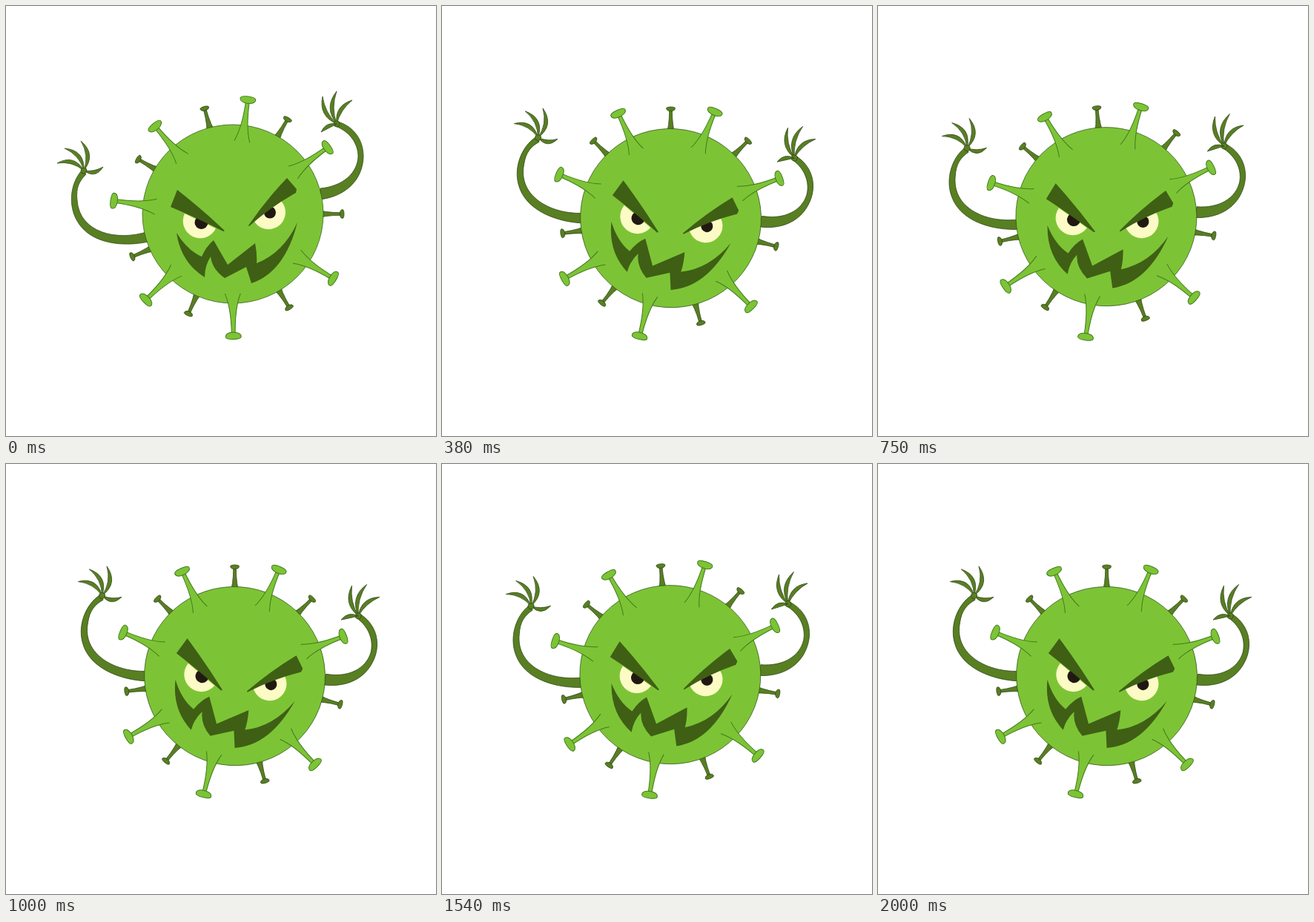
An HTML page for the animation above (2.04 s loop, 580x580 px).

```html
<!DOCTYPE html>
<html>
<head>
<meta charset="utf-8">
<style>
  html, body { margin: 0; width: 100%; height: 100%; overflow: hidden; background: #fff; }
  svg { display: block; width: 100vw; height: 100vh; }
  .back { fill: #587f22; stroke: #2c4212; stroke-width: .7; }
  .body { fill: #7cc435; stroke: #2f4f17; stroke-width: .7; }
  .spike { fill: #7cc435; stroke: #437a1d; stroke-width: 1; }
  .face { fill: #3f5f15; }
  .eye { fill: #fcfbc6; }
  .pupil { fill: #211911; }
</style>
</head>
<body>
<svg viewBox="0 0 580 580">
  <g id="virus">
    <g id="back" class="back">
      <path d="M192 304C150 318 99 306 96 262C94 245 99 236 108 227L102 222C86 240 84 270 96 290C114 322 160 325 192 318Z"/>
      <path d="M424 246C455 243 474 225 475 203C475 185 463 169 444 162L448 156C470 163 483 182 482 205C480 238 455 257 424 261Z"/>
    </g>
    <ellipse class="body" cx="306" cy="280.5" rx="122" ry="120.5"/>
    <g id="front" class="spike"></g>
    <path class="eye" d="M241 280L283 300A23 23 0 0 1 241 280ZM334 289L371 263A22.8 22.8 0 1 1 334 289Z"/>
    <circle class="pupil" cx="263.5" cy="292" r="9"/>
    <circle class="pupil" cx="356" cy="278.5" r="8"/>
    <path class="face" d="M231 248L222 271Q262 288 293 304L295 303Q263 273 231 248ZM379 232L392 247L391 252Q357 271 328 297L327 296Q351 261 379 232Z"/>
    <path class="face" d="M230 306Q245 330 264 338Q270 324 280 316L299 349L336 320Q339 335 338 347Q374 333 393 292Q376 359 331 374L324 352L295 367Q278 355 276 338Q268 350 268 366Q236 346 230 306Z"/>
  </g>
</svg>
<script>
const $ = id => document.getElementById(id);

function addPath(parent, d, transform = '') {
  const p = document.createElementNS('http://www.w3.org/2000/svg', 'path');
  p.setAttribute('d', d);
  p.setAttribute('transform', transform);
  parent.append(p);
}

// Radial spikes: a cap at the outer radius, a stem that flares at the inner one
function ring(parent, { x, y, outer, inner, cap, stem, flare }, angles) {
  const len = outer - inner, bend = len * .66, h = cap * .45;
  for (const a of angles) {
    const place = `translate(${x} ${y}) rotate(${a + 90}) translate(0 ${-outer})`;
    addPath(parent, `M${-flare} ${len}Q${-stem} ${bend} ${-stem} 2H${stem}Q${stem} ${bend} ${flare} ${len}`, place);
    addPath(parent, `M${-cap} 0C${-cap} ${-h} ${cap} ${-h} ${cap} 0Q${cap} ${h} ${stem} ${h + 1}H${-stem}Q${-cap} ${h} ${-cap} 0Z`, place);
  }
}

// A curved leaf from palm to tip; curl is the sideways bend relative to its length
function finger([x, y], [tx, ty], curl) {
  const dx = tx - x, dy = ty - y, width = 5 / Math.hypot(dx, dy);
  const control = k => `${x + dx / 2 + dy * k} ${y + dy / 2 - dx * k}`;
  addPath($('back'), `M${x} ${y}Q${control(curl + width)} ${tx} ${ty}Q${control(curl - width)} ${x} ${y}Z`);
}

function hand(palm, tips, curl) {
  tips.forEach(tip => finger(palm, tip, curl));
  addPath($('back'), `M${palm}m-4 0a4 4 0 1 0 8 0a4 4 0 1 0 -8 0`);
}

hand([105, 222], [[69, 212], [79, 192], [101, 182], [131, 217]], -.36);
hand([446, 159], [[427, 122], [446, 115], [467, 127]], .29);
finger([446, 159], [425, 170], -.2);

ring($('back'), { x: 306, y: 280.5, outer: 148, inner: 110, cap: 6, stem: 1.8, flare: 7 },
  [-105, -60, 0, 59, 114, 157, 210]);
ring($('front'), { x: 304, y: 285, outer: 161, inner: 103, cap: 10.5, stem: 2.4, flare: 10.5 },
  [-82, -36, 31, 89, 136, 188, 230]);

// Five poses swing back and forth at 30 steps a second, shown at 24 fps
function draw(now) {
  const t = Math.floor(now % 2040 / 10) * 10;
  const shown = Math.floor((t + 4.9) * .024);
  const step = Math.max(0, Math.ceil(shown * 1.25) - 1);
  const pose = 4 - Math.abs(4 - step % 8);
  $('virus').setAttribute('transform', `rotate(${pose * 5} 286 293)`);
}

const start = performance.now();
function tick() {
  draw(performance.now() - start);
  requestAnimationFrame(tick);
}
tick();
</script>
</body>
</html>
```
